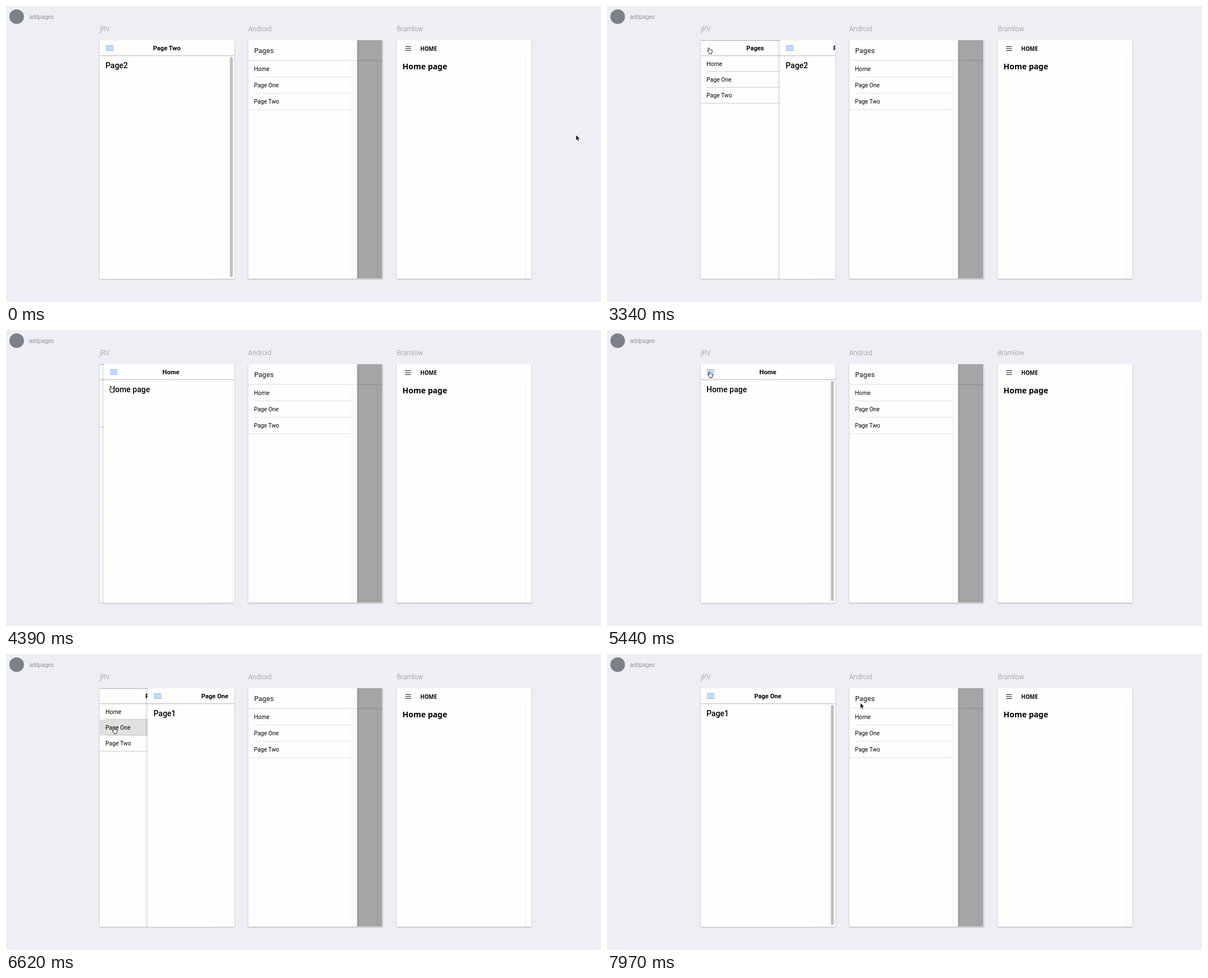
Recreate the animation shown at these times as an HTML page. Size 1060 by 528 pixels, loop 8 s.

```html
<!DOCTYPE html>
<html lang="en">
<head>
<meta charset="utf-8">
<title>Side menu preview</title>
<style>
  html, body { margin: 0; width: 100%; height: 100%; overflow: hidden; background: #eeeff4; }
  svg { display: block; }
  text { font: 400 10.4px Roboto, sans-serif; fill: #000; }
  .label { font-size: 12.1px; font-weight: 300; fill: #8b8e95; }
  .project { font-size: 10.2px; font-weight: 300; fill: #666a72; }
  .title { font-size: 11.15px; font-weight: 600; text-anchor: middle; }
  .heading { font-size: 14px; font-weight: 500; }
  .android { font-size: 10.25px; }
  .drawer { font-size: 12.5px; font-weight: 500; fill: #424242; }
  .win { font: 700 9.7px "Noto Sans", sans-serif; }
  .win.big { font-size: 14.05px; }
  .card { fill: #fefefe; filter: drop-shadow(0 1px 1.3px rgba(0, 0, 0, .3)); }
</style>
</head>
<body>
<svg id="stage" width="1060" height="528" viewBox="0 0 1060 528"></svg>
<script>
const items = ['Home', 'Page One', 'Page Two'];
const headings = ['Home page', 'Page1', 'Page2'];

const rect = (x, y, w, h, fill, extra = '') =>
  `<rect x="${x}" y="${y}" width="${w}" height="${h}" fill="${fill}" ${extra}/>`;
const text = (x, y, cls, str, id = '') =>
  `<text x="${x}" y="${y}" class="${cls}" id="${id}">${str}</text>`;
const burger = (x, y, w, gap, h, fill) =>
  [0, 1, 2].map(i => rect(x, y + i * gap, w, h, fill)).join('');
const card = x => `<rect class="card" x="${x}" y="61" width="240" height="425.5"/>`;
const thumb = (x, id) => rect(x, 91, 5, 392.5, '#bebebe', `rx="2.5" id="${id}"`);

// Item list: text and a rule below each row, inset except under the last
const list = (x, y, step, width, drop, cls, line) => items.map((name, i) => {
  const inset = i < 2 ? 10.4 : 0, mid = y + i * step;
  return text(x + 10.3, mid + 3.6, cls, name) + rect(x + inset, mid + drop, width - inset, 1, line);
}).join('');

const chevrons = items.map((_, i) =>
  `<path d="M335.5 ${98.8 + i * 28.3}l4.2 4.4-4.2 4.4" fill="none" stroke="#c3c3c7" stroke-width="1.2"/>`).join('');

const menu = rect(167, 61, 194, 426, '#fefefe') +
  rect(167, 61, 194, 1, '#b2b2b2') + rect(167, 88.2, 194, 1, '#b4b4b4') +
  text(263.9, 79, 'title', 'Pages') + rect(167, 89, 184.5, 28, '#e0e0e0', 'id="press"') +
  list(167, 103, 28.3, 184.5, 13.2, '', '#c6c6c8') + chevrons +
  rect(351, 89, 1, 398, '#e6e6e6') + thumb(353.7, 'menuThumb');

const page = rect(161, 61, 6, 426, 'url(#edge)') + rect(167, 61, 240, 426, '#fefefe') +
  rect(167, 88.2, 240, 1, '#b4b4b4') + burger(178, 70.8, 13.4, 3.6, 1.2, '#488aff') +
  text(286.5, 79, 'title', '', 'title') + text(177.2, 111, 'heading', '', 'heading') +
  rect(396.5, 89.2, 1, 398, '#ebebeb') + thumb(399, 'pageThumb');

const android = card(431.5) +
  rect(625.5, 61, 45, 425, '#a5a5a5') + rect(625.5, 96.5, 45, 1.6, '#929292') +
  rect(661, 98, 1, 388, '#999') + rect(625.5, 61, 3, 425, '#888', 'opacity=".35"') +
  rect(431.5, 96.5, 194, 1, '#dadada') + rect(616, 97, 1, 389, '#ececec') +
  text(441.9, 83.5, 'drawer', 'Pages') + list(431.5, 112, 29.2, 185, 14, 'android', '#dedede');

const desktop = card(696) + burger(711, 72, 10.6, 3.5, 1, '#111') +
  text(738, 79.6, 'win', 'HOME') + text(706.2, 113, 'win big', 'Home page') +
  rect(925.3, 91, 1, 395, '#f0f0f0');

const $ = id => document.getElementById(id);
$('stage').innerHTML = `
  <defs><linearGradient id="edge"><stop stop-opacity="0"/><stop offset="1" stop-opacity=".11"/></linearGradient></defs>
  <circle cx="19" cy="19" r="13" fill="#7c8088"/>` +
  text(41, 23, 'project', 'addpages') +
  ['jRV', 'Android', 'Bramlow'].map((name, i) => text(167 + i * 264.5, 45.4, 'label', name)).join('') +
  card(167) + android + desktop +
  `<svg x="167" y="61" width="240" height="425.5" viewBox="167 61 240 425.5">${menu}<g id="page">${page}</g></svg>
  <g id="cursor" stroke-linejoin="round">
    <path id="arrow" stroke="#fff" stroke-width=".7" d="M0 0V10L2.3 7.9 3.8 11.4 5.4 10.7 3.9 7.3H7Z"/>
    <path id="hand" fill="#fff" stroke="#000" stroke-width=".9"
      d="M2.2.6Q3.6.2 3.9 1.6L4.3 3.6Q5.3 3 5.9 4 7 3.6 7.4 4.5 8.8 4.4 8.9 5.8 9 8 7.9 9.6V11.2H3.6V10Q1.6 8.2.5 6.2.4 5 1.8 5.4L2.6 6.2 1.5 2Q1.2.9 2.2.6Z"/>
  </g>`;

// The screen refreshes every 150 ms, counted anew from each of these times.
const restarts = [900, 1850, 3190, 6030, 6620];
function refreshTime(t) {
  const start = restarts.filter(r => r <= t).pop();
  return start ? start + Math.floor((t - start) / 150) * 150 : 0;
}

// cubic-bezier(a, 0, b, 1)
function ease(x, a, b) {
  x = Math.min(1, Math.max(0, x));
  let lo = 0, hi = 1, s;
  for (let i = 0; i < 24; i++) {
    s = (lo + hi) / 2;
    const u = 1 - s;
    if (3 * u * u * s * a + 3 * u * s * s * b + s * s * s < x) lo = s; else hi = s;
  }
  return s * s * (3 - 2 * s);
}

// Each move leads on from the one before; bow bends it downwards.
const home = { x: 1015.5, y: 230 };
const moves = [
  { from: 800, to: 2000, x: 174.5, y: 77.5, bow: 110 },
  { from: 2000, to: 2300, x: 178.6, y: 74.2, hand: true },
  { from: 3490, to: 3940, x: 183.5, y: 100.5, hand: true },
  { from: 4700, to: 5590, x: 179, y: 72 },
  { from: 5740, to: 6200, x: 189, y: 131, hand: true },
  { from: 6920, to: 7670, x: 505, y: 97 },
  { from: 7670, to: 7970, x: 451.3, y: 87 }
];
function cursorAt(t) {
  let { x, y } = home, hand = false;
  for (const m of moves) {
    if (t <= m.from) break;
    const k = ease((t - m.from) / (m.to - m.from), 1 / 3, 2 / 3);
    x += (m.x - x) * k;
    y += (m.y - y) * k + (m.bow || 0) * Math.sin(Math.PI * k);
    hand = m.hand;
  }
  const overBurger = x > 176 && x < 193 && y < 88;
  return { x, y, hand: hand || overBurger };
}

const visits = [{ open: 3236, close: 4147, item: 0 }, { open: 5745, close: 6470, item: 1 }];
const show = (id, on) => $(id).setAttribute('visibility', on ? 'visible' : 'hidden');

function draw(t) {
  let shift = 0, current = 2, pressed = false, pageThumb = true, menuThumb = false;
  for (const { open, close, item } of visits) {
    if (t < open) break;
    const closing = t >= close;
    shift = 194 * (closing ? 1 - ease((t - close) / 280, .4, .6) : ease((t - open) / 280, 0, .2));
    if (closing) current = item;
    pageThumb = t >= close + 360;
    menuThumb = !closing && shift > 193;
    pressed = t >= close - 140 && t < close + 200;
    $('press').setAttribute('y', 89 + item * 28.2);
  }
  $('page').setAttribute('transform', `translate(${shift})`);
  $('title').textContent = items[current];
  $('heading').textContent = headings[current];
  show('pageThumb', pageThumb);
  show('menuThumb', menuThumb);
  show('press', pressed);

  const { x, y, hand } = cursorAt(t);
  $('cursor').setAttribute('transform', `translate(${x} ${y})`);
  show('hand', hand);
  show('arrow', !hand);
}

function tick() {
  draw(refreshTime(performance.now() % 8000));
  requestAnimationFrame(tick);
}
tick();
</script>
</body>
</html>
```
